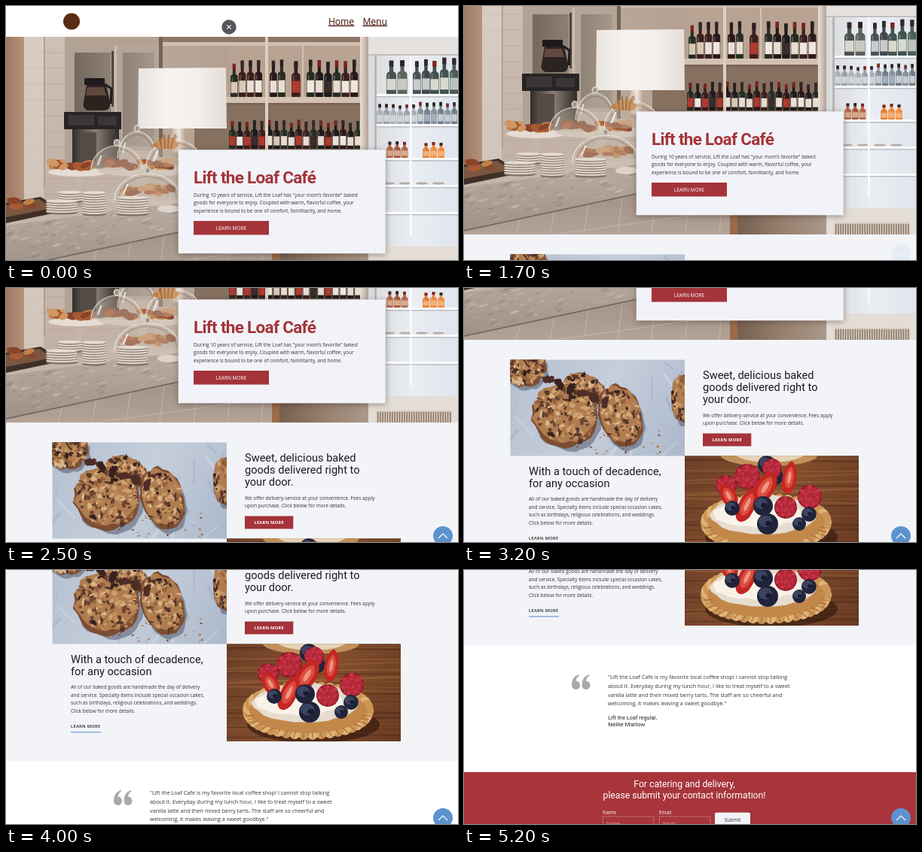
Animation, 600 px wide and 338 px high, one loop 6900 ms. Source, as an HTML page with a canvas:

```html
<!DOCTYPE html>
<html lang="en">
<head>
<meta charset="utf-8">
<title>Café page scroll</title>
<style>
html, body { margin: 0; width: 100%; height: 100%; overflow: hidden; background: #fff; }
#stage { position: relative; width: 600px; height: 338px; overflow: hidden; }
#page, #page canvas, #page svg, #over { position: absolute; left: 0; top: 0; }
text { font-family: "Open Sans", sans-serif; font-size: 6.5px; fill: #333336; white-space: pre; }
.nav { font-size: 12px; fill: #56261a; text-decoration: underline; text-shadow: .5px .5px 1px rgba(60, 20, 10, .3); }
.title { font: 700 22.5px Roboto, sans-serif; letter-spacing: -.7px; fill: #a4343a; }
.head { font: 14.6px Roboto, sans-serif; fill: #1c1c20; }
.quote { font-size: 7.25px; }
.by { font: 7.3px Roboto, sans-serif; fill: #222; }
.who { font: 8.1px Roboto, sans-serif; fill: #222; }
.btn { fill: #fff; font-weight: 500; text-anchor: middle; }
.small { font-size: 5.7px; font-weight: 700; letter-spacing: .25px; }
.link { font-size: 5.7px; font-weight: 600; letter-spacing: .35px; fill: #222; }
.call { font: 12.2px Roboto, sans-serif; fill: #fff; text-anchor: middle; }
.label { fill: #fff; font-weight: 500; }
.hint { fill: #d9a3a6; }
.send { text-anchor: middle; }
</style>
</head>
<body>
<div id="stage">
  <div id="page">
    <canvas id="art" width="600" height="912"></canvas>
    <svg id="copy" width="600" height="912"></svg>
  </div>
  <svg id="over" width="600" height="338">
    <g id="close">
      <circle r="9.7" fill="#55565a"/>
      <path d="M-2.7-2.7 2.7 2.7M2.7-2.7-2.7 2.7" stroke="#fff" stroke-width="1.1"/>
    </g>
    <g id="up" transform="translate(580 330)">
      <circle r="13" fill="#5e92cf"/>
      <path d="M-6 3 0-3 6 3" fill="none" stroke="#fff" stroke-width="1.2"/>
    </g>
  </svg>
</div>
<script>
const $ = id => document.getElementById(id);
const c = $('art').getContext('2d');

// ---------- drawing helpers ----------
let seed = 7;
const rnd = (a = 0, b = 1) => {
  seed = (seed * 16807) % 2147483647;
  return a + (b - a) * seed / 2147483647;
};
const pick = list => list[Math.floor(rnd(0, list.length))];

function rect(x, y, w, h, fill) {
  c.fillStyle = fill;
  c.fillRect(x, y, w, h);
}
function fade(x0, y0, x1, y1, ...stops) {
  const g = c.createLinearGradient(x0, y0, x1, y1);
  stops.forEach((s, i) => g.addColorStop(i / (stops.length - 1), s));
  return g;
}
function oval(x, y, rx, ry, fill, turn = 0) {
  c.beginPath();
  c.ellipse(x, y, rx, ry, turn, 0, 7);
  c.fillStyle = fill;
  c.fill();
}
function poly(fill, ...p) {
  c.beginPath();
  for (let i = 0; i < p.length; i += 2) c.lineTo(p[i], p[i + 1]);
  c.fillStyle = fill;
  c.fill();
}
function line(color, w, ...p) {
  c.beginPath();
  for (let i = 0; i < p.length; i += 2) c.lineTo(p[i], p[i + 1]);
  c.strokeStyle = color;
  c.lineWidth = w;
  c.stroke();
}
function shape(fill, d) {
  c.fillStyle = fill;
  c.fill(new Path2D(d));
}
function blob(x, y, rx, ry, fill, rough = .1, turn = 0) {
  c.save();
  c.translate(x, y);
  c.rotate(turn);
  c.beginPath();
  for (let i = 0; i < 28; i++) {
    const a = i * Math.PI / 14, r = 1 + rnd(-rough, rough);
    c.lineTo(Math.cos(a) * rx * r, Math.sin(a) * ry * r);
  }
  c.fillStyle = fill;
  c.fill();
  c.restore();
}
function framed(x, y, w, h, draw) {
  c.save();
  c.beginPath();
  c.rect(x, y, w, h);
  c.clip();
  draw();
  c.restore();
}

// ---------- café picture ----------
function bottle(x, base, w, h, glass, label) {
  rect(x + w * .3, base - h, w * .4, h * .45, glass);
  rect(x + w * .28, base - h, w * .44, h * .18, pick(['#7a2420', '#2a2020', '#33292a']));
  c.fillStyle = glass;
  c.beginPath();
  c.roundRect(x, base - h * .68, w, h * .68, [w * .4, w * .4, 1, 1]);
  c.fill();
  rect(x + .5, base - h * .45, w - 1, h * .33, label);
  rect(x + w * .15, base - h * .6, w * .15, h * .14, 'rgba(255,255,255,.25)');
}
function row(x0, x1, base, step, h, glass, labels) {
  for (let x = x0; x < x1; x += step)
    bottle(x, base, step * .9, h * rnd(.92, 1.04), pick(glass), pick(labels));
}
const wine = ['#2b1a1a', '#1f1a1c', '#3a1f1c', '#262c22'];
const paper = ['#e6dcd0', '#d8c8b4', '#efe7de', '#b03a30', '#e9e0d6', '#3a2c2a'];

function plates(x, base, n, w) {
  oval(x, base + 1, w / 2, 2.5, '#6e6057');
  for (let i = 0; i < n; i++) {
    oval(x, base - i * 3.3, w / 2, 2.6, '#94857a');
    oval(x, base - 1.2 - i * 3.3, w / 2, 2.2, '#e5dbd2');
  }
}
function dome(x, y, rx, ry) {
  c.beginPath();
  c.ellipse(x, y, rx, ry, 0, Math.PI, 0);
  c.fillStyle = 'rgba(196,182,168,.42)';
  c.fill();
  c.strokeStyle = 'rgba(244,240,235,.8)';
  c.lineWidth = 1.2;
  c.stroke();
  c.beginPath();
  c.ellipse(x, y, rx * .88, ry * .88, 0, Math.PI * 1.05, Math.PI * 1.95);
  c.strokeStyle = 'rgba(110,92,80,.4)';
  c.stroke();
  oval(x, y - ry - 4, 4.5, 5, 'rgba(215,206,197,.95)');
  oval(x, y - ry - 4, 2.5, 3, 'rgba(150,134,122,.8)');
  line('rgba(255,255,255,.75)', 2, x - rx * .6, y - ry * .6, x - rx * .74, y - ry * .2);
}
function pastry(x, y, w, n) {
  for (let i = 0; i < n; i++)
    oval(x + rnd(-w, w), y + rnd(-5, 4), rnd(6, 10), rnd(3, 5), pick(['#a85a35', '#c08048', '#87452a', '#cf9763']), rnd(-.5, .5));
}

function cafe() {
  rect(0, 41, 600, 314, fade(0, 41, 0, 300, '#cfc0b4', '#bfaea1'));
  // tiled wall and steel doors
  for (let y = 62; y < 290; y += 21) line('#b5a598', .8, 22, y, 300, y);
  rect(0, 41, 24, 230, fade(0, 0, 24, 0, '#9d7a63', '#b3937c'));
  rect(24, 41, 26, 230, 'rgba(228,218,209,.5)');
  rect(50, 41, 1.5, 200, '#a8978a');
  rect(78, 41, 126, 12, '#b3a294');
  rect(78, 52, 66, 165, '#b0a294');
  rect(91, 62, 48, 150, fade(91, 0, 139, 0, '#74685e', '#8d8075'));
  rect(147, 52, 56, 140, '#b3a597');
  rect(155, 62, 42, 125, fade(155, 0, 197, 0, '#8f8276', '#a5978a'));
  rect(140, 60, 3, 74, '#4f443e');
  rect(203, 41, 5, 160, '#75645a');
  // shelves
  rect(208, 41, 266, 160, fade(208, 0, 474, 0, '#b9a697', '#aa9382'));
  rect(208, 41, 266, 7, '#8e7667');
  rect(208, 48, 266, 5, '#d0bdad');
  rect(296, 53, 174, 68, '#b8a292');
  rect(250, 131, 222, 62, '#86705f');
  row(298, 340, 121, 10.8, 48, wine, paper);
  row(350, 372, 121, 11, 48, wine, paper);
  row(379, 391, 121, 13, 46, wine, paper);
  row(399, 468, 121, 11.6, 48, wine, paper);
  row(296, 468, 190, 9.8, 37, wine, paper);
  rect(208, 121, 266, 9, '#d3c1b2');
  rect(208, 129, 266, 2.5, '#7a6355');
  rect(344, 41, 4, 160, '#dccfc2');
  rect(393, 53, 2, 68, '#d4c3b4');
  rect(470, 41, 11, 300, fade(470, 0, 481, 0, '#eae0d8', '#b3a297'));
  // bright cooler
  rect(481, 41, 119, 314, fade(481, 0, 600, 0, '#d9dadc', '#eaeef3', '#dfe5ec'));
  rect(481, 41, 119, 24, '#e4e1df');
  rect(481, 64, 119, 2, '#c2bfbd');
  row(505, 532, 117, 14.5, 47, ['#5d625f', '#4a514f'], ['#cac9c0', '#d8d8d2']);
  row(540, 561, 117, 12, 47, ['#41474c', '#4b5157'], ['#c9cbcc']);
  row(563, 600, 117, 13, 47, ['#4c5f5a', '#43534f'], ['#bcc3bf', '#d9d9d0']);
  row(492, 540, 157, 9, 26, ['#a9b0b8', '#98a1ab'], ['#d0d5d8']);
  row(546, 598, 157, 9, 29, ['#717d88', '#87929c'], ['#c7cdd1', '#a3b1bf']);
  row(505, 526, 202, 9.8, 21, ['#a4553d', '#b5614a'], ['#d9aa8a']);
  row(553, 582, 202, 10, 21, ['#e47a32', '#ef8a3c'], ['#f3b179']);
  for (const y of [117, 157, 202, 238, 274]) {
    rect(490, y, 110, 3, '#fafbfd');
    rect(490, y + 3, 110, 1.5, '#b9bec4');
  }
  for (let x = 508; x < 596; x += 22) oval(x, 236, 8, 1.6, '#b8aea6');
  rect(489, 66, 3, 272, '#b6b6b6');
  rect(536, 66, 2.5, 240, 'rgba(255,255,255,.8)');
  // lamp
  rect(221, 160, 17, 35, fade(221, 0, 238, 0, '#cbb7a7', '#f0e6de', '#b7a08d'));
  poly(fade(175, 0, 294, 0, '#e9e4e0', '#f6f3f1', '#f2efec', '#e4ddd8'), 176, 83, 292, 82, 293, 163, 175, 163);
  // coffee maker
  rect(77, 141, 76, 23, '#272425');
  rect(83, 145, 34, 14, '#3b3737');
  rect(88, 164, 62, 53, fade(88, 0, 150, 0, '#332d2b', '#8a7e75', '#2f2927'));
  rect(98, 168, 22, 40, '#564c46');
  rect(122, 147, 25, 12, '#3a3637');
  shape('#2c2321', 'M107 105H133L138 128Q139 139 130 139H108Q101 136 103 128Z');
  shape('rgba(150,112,90,.5)', 'M108 108H130L133 119H106Z');
  rect(104, 96, 27, 9, '#1d1a1a');
  line('#1e1b1b', 3, 131, 104, 140, 110, 139, 130);
  // counter
  poly('#c3b6ab', 0, 262, 300, 232, 300, 275, 0, 300);
  poly(fade(0, 280, 0, 350, '#b4a89e', '#9d9188'), 0, 292, 228, 262, 300, 262, 300, 288, 0, 350);
  for (let i = 0; i < 110; i++) {
    const x = rnd(0, 226);
    oval(x, 345 - x * .22 - rnd(0, 48), rnd(1, 8), rnd(.4, 1.8), pick(['rgba(95,84,78,.18)', 'rgba(240,235,230,.2)']), -.3);
  }
  poly(fade(0, 290, 0, 355, '#a08f83', '#b3a397'), 0, 350, 300, 286, 354, 270, 354, 355, 0, 355);
  for (let x = 75; x < 352; x += 45) line('#cabcb0', .8, x, 350 - x * .21, x - 6, 355);
  line('#cbbdb1', .8, 120, 355, 354, 322);
  line('#6d625b', 1.6, 0, 350, 229, 301);
  rect(353, 300, 10, 55, '#9a6b49');
  rect(363, 300, 120, 55, fade(363, 0, 483, 0, '#75604f', '#97806f', '#ab998b'));
  rect(481, 320, 119, 35, '#e4ddd6');
  rect(491, 339, 101, 16, '#d8cbbd');
  for (let x = 493; x < 591; x += 3.2) rect(x, 341, 1.5, 14, '#857567');
  // trays, stands, cakes and plates
  poly('#3f2f28', 0, 262, 46, 254, 72, 270, 62, 276, 0, 289);
  poly('#7a5640', 0, 265, 44, 257, 62, 269, 0, 281);
  pastry(24, 263, 16, 6);
  rect(92, 221, 9, 42, '#c4b5a8');
  oval(96, 264, 20, 4, '#b6a698');
  oval(96, 221, 40, 6, '#e5dcd4');
  pastry(87, 213, 25, 20);
  oval(182, 219, 60, 8, '#d3c7bc');
  pastry(178, 211, 44, 24);
  rect(174, 222, 14, 36, '#c8baae');
  oval(185, 259, 47, 7, '#cdbfb3');
  pastry(188, 246, 32, 18);
  dome(174, 203, 26, 36);
  dome(147, 218, 34, 32);
  dome(224, 214, 38, 36);
  dome(188, 258, 44, 35);
  pastry(214, 182, 12, 5);
  for (let i = 0; i < 9; i++) line(pick(['#a86d42', '#c79768']), 2, 205 + i * 2, 190, 201 + i * 3, 170 + rnd(0, 9));
  plates(85, 259, 4, 32);
  plates(74, 274, 5, 42);
  plates(117, 276, 9, 31);
  plates(168, 276, 7, 42);
  oval(216, 270, 15, 5, '#ddd3ca');
}

// ---------- cookie picture ----------
function cookie(x, y, rx, ry, turn = 0) {
  const k = Math.cos(turn), s = Math.sin(turn);
  blob(x + 3, y + 5, rx, ry, 'rgba(75,80,100,.5)', .05, turn);
  blob(x, y, rx, ry, '#7d4d32', .07, turn);
  blob(x - 1, y - 2, rx * .93, ry * .92, '#b07c50', .09, turn);
  for (let i = 0; i < rx * 3.4; i++) {
    const a = rnd(0, 6.28), r = Math.sqrt(rnd()) * .9;
    const px = Math.cos(a) * rx * r, py = Math.sin(a) * ry * r;
    blob(x + px * k - py * s, y + px * s + py * k, rnd(1, 5.5), rnd(.8, 3.4),
      pick(['#cfa272', '#c08d5b', '#94603c', '#54342a', '#34211d', '#6a4230', '#d9b688']), .35, rnd(0, 3));
  }
}
function cookies() {
  rect(61, 381, 232, 129, fade(61, 381, 293, 509, '#b5bfce', '#c5cedb', '#acb8cb'));
  for (let i = 0; i < 22; i++) {
    const x = rnd(61, 293), y = rnd(381, 509);
    line(pick(['rgba(255,255,255,.22)', 'rgba(110,125,155,.16)']), rnd(1, 4), x, y, x + rnd(-28, 28), y + rnd(10, 35));
  }
  cookie(80, 390, 29, 27);
  cookie(290, 434, 15, 32);
  cookie(160, 421, 30, 20, .35);
  cookie(208, 456, 28, 42, -.3);
  cookie(134, 456, 45, 41, .5);
  for (let i = 0; i < 6; i++) blob(112 + i * 15, 408 + i * 6, 9, 5, pick(['#39221f', '#4d2c25']), .25, i);
  for (let i = 0; i < 30; i++) blob(rnd(150, 265), rnd(475, 508), rnd(.5, 2), rnd(.5, 1.6), pick(['#764c34', '#b3855b']), .2);
}

// ---------- tart picture ----------
function raspberry(x, y, r) {
  oval(x, y, r, r, '#8e1a2a');
  for (let i = 0; i < 40; i++) {
    const a = i * 2.4, d = Math.sqrt(i / 40) * r * .88;
    const px = x + Math.cos(a) * d, py = y + Math.sin(a) * d;
    oval(px, py, r * .17, r * .17, i % 3 ? '#b32638' : '#c43445');
    oval(px - .5, py - .7, .5, .4, '#d8686f');
  }
}
function blueberry(x, y, r) {
  oval(x, y, r, r, '#20243a');
  oval(x - r * .2, y - r * .25, r * .65, r * .55, '#3c4460');
  oval(x + r * .1, y - r * .05, r * .3, r * .25, '#191b2d');
}
function slice(x, y, w, h, turn) {
  c.save();
  c.translate(x, y);
  c.rotate(turn);
  c.scale(w, h);
  const d = 'M0-1C.75-.8 1-.1.75.6Q.45 1 0 1Q-.5 1-.75.6C-1-.1-.7-.8 0-1Z';
  shape('#c32623', d);
  c.scale(.6, .65);
  shape('#dc4d3f', d);
  c.scale(.4, .6);
  shape('#ee9580', d);
  c.restore();
}
function tart() {
  rect(293, 509, 231, 130, fade(293, 520, 524, 630, '#6f4028', '#84502e', '#683a22'));
  for (let i = 0; i < 32; i++) {
    const y = rnd(512, 638);
    line(pick(['rgba(45,20,10,.2)', 'rgba(220,150,95,.16)']), rnd(.6, 2.5), 293, y, 524, y + rnd(-9, 9));
  }
  oval(405, 509, 64, 14, '#c0915a');
  oval(406, 505, 47, 13, '#e6d2b6');
  oval(408, 617, 88, 24, 'rgba(30,10,4,.5)');
  for (let i = 0; i < 42; i++) {
    const a = i * Math.PI / 21;
    oval(401 + Math.cos(a) * 79, 598 + Math.sin(a) * 29, 8, 10, i % 2 ? '#cc9656' : '#dfb275');
  }
  oval(401, 598, 78, 30, '#c28849');
  for (let i = 0; i < 20; i++) {
    const a = .1 + i * .155;
    line('#a96d33', 1.2, 401 + Math.cos(a) * 72, 602 + Math.sin(a) * 25, 401 + Math.cos(a) * 83, 602 + Math.sin(a) * 33);
  }
  blob(397, 588, 69, 26, '#e6dccf', .05);
  blob(390, 586, 58, 18, '#f8f2e8', .08);
  blueberry(402, 521, 12);
  blueberry(413, 537, 11);
  raspberry(376, 537, 17);
  raspberry(348, 549, 14);
  raspberry(409, 526, 13);
  slice(432, 538, 11, 22, .15);
  slice(400, 551, 15, 24, .55);
  slice(376, 574, 13, 25, .45);
  slice(351, 562, 12, 17, -.5);
  blueberry(356, 579, 10);
  blueberry(397, 576, 13);
  raspberry(427, 578, 15);
  raspberry(459, 564, 16);
  blueberry(458, 587, 10);
  blueberry(445, 600, 9);
  blueberry(403, 600, 14);
}

// ---------- page ----------
function paintPage() {
  rect(0, 0, 600, 912, '#fff');
  rect(0, 355, 600, 310, '#f2f4f8');
  rect(0, 834, 600, 78, '#a7353b');
  oval(87, 20.5, 11, 11, '#5a2a12');
  framed(0, 41, 600, 314, cafe);
  framed(61.5, 381.5, 231.5, 128, cookies);
  framed(293, 509.3, 231, 130, tart);

  c.save();
  c.shadowColor = 'rgba(40,25,20,.4)';
  c.shadowBlur = 8;
  c.shadowOffsetY = 2;
  rect(228.7, 191.3, 275, 138, '#f2f3f8');
  c.restore();
  rect(249, 286, 100, 18.5, '#a4343a');
  rect(317, 479.5, 64.3, 17, '#a4343a');
  rect(86, 626.3, 40, 1.1, '#5e92cf');

  for (const x of [143, 156.5])
    shape('#a9a9a9', `M${x + 9.5} 704Q${x} 707 ${x} 718A5.5 5.7 0 1 0 ${x + 5.5} 712.6Q${x + 6} 708 ${x + 10} 705.2Z`);

  c.setLineDash([1.5, 1]);
  c.strokeStyle = '#d9a9a2';
  c.lineWidth = .8;
  for (const x of [184, 259]) c.strokeRect(x + .4, 893, 67.5, 18);
  c.setLineDash([]);
  c.fillStyle = '#f2f3f7';
  c.beginPath();
  c.roundRect(333, 887.7, 47, 19, 2);
  c.fill();
}

function write(cls, x, y, rows, dy = 0) {
  rows.split('\n').forEach((s, i) => {
    const el = document.createElementNS('http://www.w3.org/2000/svg', 'text');
    el.setAttribute('class', cls);
    el.setAttribute('x', x);
    el.setAttribute('y', y + i * dy);
    el.textContent = s;
    $('copy').append(el);
  });
}
function writePage() {
  write('nav', 428, 24.5, 'Home');
  write('nav', 473.5, 24.5, 'Menu');
  write('title', 249, 236.2, 'Lift the Loaf Café');
  write('', 249, 254, `During 10 years of service, Lift the Loaf has "your mom's favorite" baked
goods for everyone to enjoy. Coupled with warm, flavorful coffee, your
experience is bound to be one of comfort, familitarity, and home.`, 10.45);
  write('btn', 299, 297.6, 'LEARN MORE');
  write('head', 317, 407.2, 'Sweet, delicious baked\ngoods delivered right to\nyour door.', 16);
  write('', 317, 457.6, 'We offer delivery-service at your convenience. Fees apply\nupon purchase. Click below for more details.', 10.45);
  write('btn small', 349.2, 490.2, 'LEARN MORE');
  write('head', 86, 534.6, 'With a touch of decadence,\nfor any occasion', 16);
  write('', 86, 569.3, `All of our baked goods are handmade the day of delivery
and service. Specialty items include special occasion cakes,
such as birthdays, religious celebrations, and weddings.
Click below for more details.`, 10.45);
  write('link', 86, 621, 'LEARN MORE');
  write('quote', 191, 710.2, `"Lift the Loaf Cafe is my favorite local coffee shop! I cannot stop talking
about it. Everyday during my lunch hour, I like to treat myself to a sweet
vanilla latte and their mixed berry tarts. The staff are so cheerful and
welcoming, it makes leaving a sweet goodbye."`, 11.7);
  write('by', 191.3, 763.7, 'Lift the Loaf regular,');
  write('who', 191.3, 773.4, 'Nellie Marlow');
  write('call', 292.5, 854.3, 'For catering and delivery,\nplease submit your contact information!', 14.6);
  write('label', 184, 889.8, 'Name');
  write('label', 259, 889.8, 'Email');
  write('hint', 189, 905, 'Name');
  write('hint', 264, 905, 'Email');
  write('send', 356.5, 899.8, 'Submit');
}

// ---------- motion ----------
const LOOP = 6900, STEP = 100, SPEED = .1565;
const clamp = x => Math.max(0, Math.min(1, x));
// distance covered while speeding up over d, then cruising at 1
const ramp = (x, d) => x < 0 ? 0 : x < d ? x * x / (2 * d) : x - d / 2;
const scrollAt = t => SPEED * (ramp(t - 1050, 650) - ramp(t - 4770, 430));

function show(now) {
  const t = Math.floor((now % LOOP) / STEP) * STEP;
  $('page').style.transform = `translateY(${-Math.round(scrollAt(t))}px)`;
  const out = clamp(t / 300);
  $('close').setAttribute('transform', `translate(296 ${28 - 40 * out * out})`);
  $('close').setAttribute('opacity', out < 1 ? 1 : 0);
  $('up').setAttribute('opacity', clamp((t - 1670) / 400));
}

paintPage();
writePage();
const start = performance.now();
function tick() {
  show(performance.now() - start);
  requestAnimationFrame(tick);
}
tick();
</script>
</body>
</html>
```
